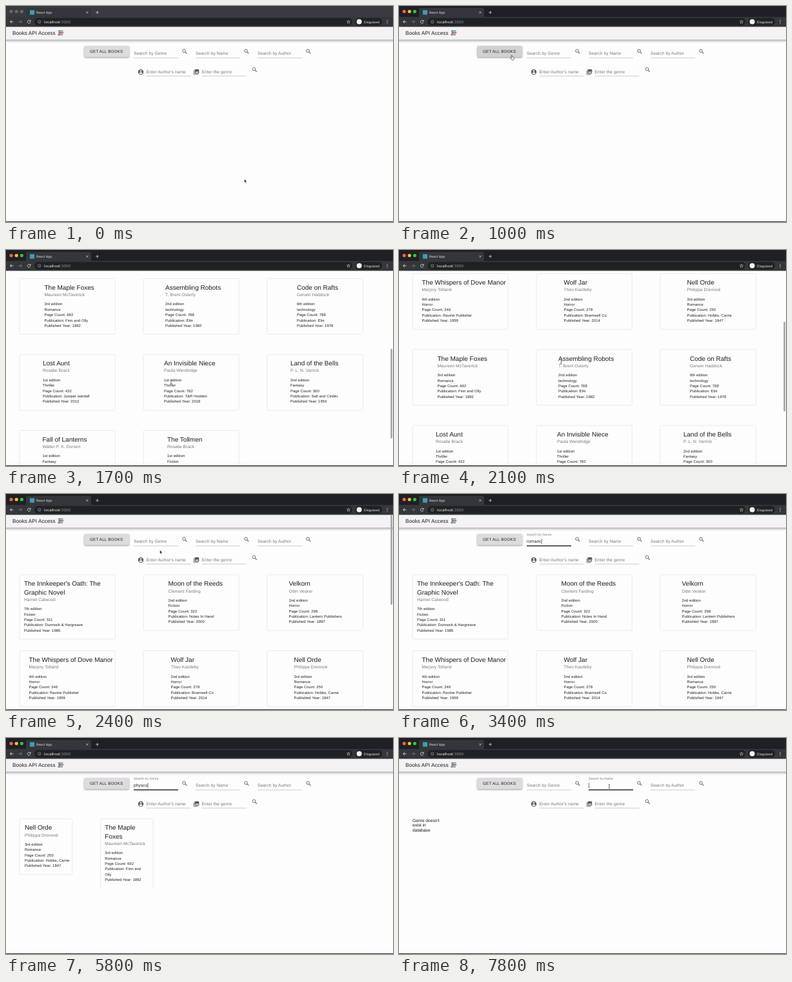
These frames come from a looping animation (600x337 px, 8 s). An HTML page with a canvas:

```html
<!DOCTYPE html>
<html lang="en">
<head>
<meta charset="utf-8">
<title>Books API Access</title>
<style>
  html, body { margin: 0; width: 100%; height: 100%; overflow: hidden; background: #fefdfe; }
  canvas { display: block; width: 600px; height: 337px; }
</style>
</head>
<body>
<canvas id="stage"></canvas>
<script>
const LOOP = 8000;
const PAGE = '#fefdfe', INK = '#1d1c1e', GREY = '#777579', ICON = '#5b595d';
const SANS = '"Liberation Sans", Arial, sans-serif';
const UI = 'Inter, Roboto, sans-serif';

const canvas = document.getElementById('stage');
const ctx = canvas.getContext('2d');
const dpr = Math.max(1, window.devicePixelRatio || 1);
canvas.width = 600 * dpr;
canvas.height = 337 * dpr;

// text x, title, author, edition, genre, pages, publisher, year
const BOOKS = [
  [28, "The Innkeeper's Oath: The|Graphic Novel", 'Harriet Calwood', '7th', 'Fiction', 311, 'Dunnock & Hargreave', 1985],
  [251.5, 'Moon of the Reeds', 'Clement Farding', '2nd', 'Fiction', 322, 'Notes In Hand', 2000],
  [438.5, 'Velkorn', 'Odin Vesker', '2nd', 'Horror', 298, 'Lantern Publishers', 1897],
  [35.5, 'The Whispers of Dove Manor', 'Marjory Tolland', '4th', 'Horror', 246, 'Ravine Publisher', 1959],
  [255.5, 'Wolf Jar', 'Theo Kastleby', '2nd', 'Horror', 278, 'Bramwell Co', 2014],
  [446.5, 'Nell Orde', 'Philippa Drennoë', '3rd', 'Romance', 250, 'Hobbs, Carne', 1847],
  [59.5, 'The Maple Foxes', 'Maureen McTaverick', '3rd', 'Romance', 692, 'Finn and Olly', 1892],
  [247, 'Assembling Robots', 'T. Brent Osterly', '2nd', 'technology', 788, 'Elm', 1982],
  [451, 'Code on Rafts', 'Gerwin Haddock', '6th', 'technology', 788, 'Elm', 1978],
  [57, 'Lost Aunt', 'Rosalie Brack', '1st', 'Thriller', 432, 'Juniper wardell', 2012],
  [245, 'An Invisible Niece', 'Paula Wendridge', '1st', 'Thriller', 782, 'T&R Hodden', 2018],
  [441, 'Land of the Bells', 'P. L. N. Varrick', '2nd', 'Fantasy', 300, 'Salt and Cinder', 1954],
  [56.5, 'Fall of Lanterns', 'Walter P. K. Dorsen', '1st', 'Fantasy', 654, 'Elm', 1996],
  [250, 'The Tollmen', 'Rosalie Brack', '1st', 'Fiction', 100, 'Ravine Publisher', 2014],
];

const FIELDS = [
  { x: 198, y: 81, label: 'Search by Genre', focus: [[2600, 4000], [4750, 6500]] },
  { x: 294, y: 81, label: 'Search by Name', focus: [[6830, LOOP + 1000]] },
  { x: 390, y: 81, label: 'Search by Author', focus: [] },
  { x: 217.5, y: 109.3, label: "Enter Author's name", focus: [] },
  { x: 303.5, y: 109.3, label: 'Enter the genre', focus: [] },
];
const SEARCH_ICONS = [[277, 71], [373, 71], [469, 71], [385.5, 99.5]];

const TYPING = [
  { word: 'romance', at: [2800, 2900, 3000, 3200, 3300, 3400, 3500], end: 4000 },
  { word: 'physcology', at: [5200, 5400, 5500, 5650, 5700, 5800, 6000, 6050, 6100, 6200], end: 6500 },
];

const POINTER = [
  [0, 369.5, 270], [150, 369.5, 270], [850, 174.8, 77], [1150, 174.8, 77],
  [1400, 256, 206], [1950, 256, 206], [2400, 238.5, 87.5], [2580, 228, 75],
  [3650, 228, 75], [3850, 277, 71], [4050, 277, 71], [4300, 305, 81.5],
  [4400, 305, 81.5], [4700, 250, 74.5], [6200, 250, 74.5], [6400, 277, 71],
  [6550, 277, 71], [6800, 326, 75.5], [LOOP, 326, 75.5],
];
const POINTER_HIDDEN = [[2800, 3650], [5200, 6250]];
const SCROLL = [[0, 0], [1300, 0], [1700, 318.5], [1800, 345], [1950, 345], [2300, 0], [LOOP, 0]];

const within = (t, spans) => spans.find(([a, b]) => t >= a && t < b);
const smooth = u => u * u * (3 - 2 * u);
const clamp01 = u => Math.min(1, Math.max(0, u));

function along(keys, t) {
  const i = Math.max(1, keys.findIndex(k => k[0] > t));
  const a = keys[i - 1], b = keys[i];
  const u = smooth(clamp01((t - a[0]) / (b[0] - a[0])));
  return a.slice(1).map((v, n) => v + (b[n + 1] - v) * u);
}

function rect(x, y, w, h, color, r = 0) {
  ctx.fillStyle = color;
  ctx.beginPath();
  ctx.roundRect(x, y, w, h, r);
  ctx.fill();
}

function disc(x, y, r, color) {
  ctx.fillStyle = color;
  ctx.beginPath();
  ctx.arc(x, y, r, 0, Math.PI * 2);
  ctx.fill();
}

function line(points, color, width = 0.8) {
  ctx.strokeStyle = color;
  ctx.lineWidth = width;
  ctx.beginPath();
  points.forEach(([x, y]) => ctx.lineTo(x, y));
  ctx.stroke();
}

function polygon(points, color, outline) {
  ctx.beginPath();
  points.forEach(([x, y]) => ctx.lineTo(x, y));
  ctx.closePath();
  ctx.fillStyle = color;
  ctx.fill();
  if (outline) {
    ctx.strokeStyle = outline;
    ctx.lineWidth = 0.6;
    ctx.stroke();
  }
}

function text(str, x, y, size, color = INK, spacing = 0.0094, font = SANS) {
  ctx.font = `${size}px ${font}`;
  ctx.letterSpacing = `${size * spacing}px`;
  ctx.fillStyle = color;
  ctx.fillText(str, x, y);
  return ctx.measureText(str).width;
}

function withShadow(blur, dy, alpha, paint) {
  ctx.save();
  ctx.shadowColor = `rgba(0,0,0,${alpha})`;
  ctx.shadowBlur = blur * dpr;
  ctx.shadowOffsetY = dy * dpr;
  paint();
  ctx.restore();
}

function browser(focused) {
  const bar = '#35363a', dark = '#202124', light = '#e4e5e8';
  rect(0, 0, 600, 18, focused ? '#1f2023' : '#3a3b3f');
  rect(0, 17, 600, 15.5, bar);
  rect(31, 3, 101, 17, bar, 3);
  ['#fe5f57', '#febc2e', '#28c840'].forEach((c, i) =>
    disc(8 + 8.2 * i, 8.6, 2.6, focused ? c : '#66676a'));
  rect(37, 6.5, 7, 7, '#3b9fb5');
  text('React App', 47, 11.9, 5, light, 0, UI);
  line([[124.3, 8.5], [127.5, 11.7]], light, 0.6);
  line([[127.5, 8.5], [124.3, 11.7]], light, 0.6);
  line([[139.2, 10], [144, 10]], light, 0.7);
  line([[141.6, 7.6], [141.6, 12.4]], light, 0.7);

  const arrow = (x, dir, color) => {
    line([[x - 2.6, 24.6], [x + 2.6, 24.6]], color);
    line([[x + dir * 0.2, 22.1], [x + dir * 2.6, 24.6], [x + dir * 0.2, 27.1]], color);
  };
  arrow(9, -1, light);
  arrow(22, 1, '#808184');
  ctx.strokeStyle = light;
  ctx.lineWidth = 0.8;
  ctx.beginPath();
  ctx.arc(35.7, 24.6, 2.4, 0.4, 5.5);
  ctx.stroke();
  polygon([[38.4, 21.8], [38.4, 24.2], [36, 24.2]], light);

  rect(44, 18.8, 493, 11.7, dark, 5.8);
  ctx.strokeStyle = '#b4b5b8';
  ctx.lineWidth = 0.6;
  ctx.beginPath();
  ctx.arc(51.8, 24.6, 2.3, 0, Math.PI * 2);
  ctx.stroke();
  line([[51.8, 24.3], [51.8, 25.9]], '#b4b5b8', 0.6);
  const w = text('localhost', 59, 26.7, 5.83, '#f1f2f4', 0, UI);
  text(':3000', 59 + w, 26.7, 5.83, '#97989c', 0, UI);
  const star = Array.from({ length: 10 }, (_, i) => {
    const a = -Math.PI / 2 + i * Math.PI / 5, r = i % 2 ? 1.2 : 2.8;
    return [531 + r * Math.cos(a), 24.8 + r * Math.sin(a)];
  });
  polygon(star, dark, '#d0d1d4');
  rect(541.5, 18.8, 41.5, 11.7, dark, 5.8);
  disc(547.6, 24.6, 4, '#f1f2f4');
  text('Disguised', 555, 26.6, 5.1, '#f1f2f4', 0, UI);
  [22.4, 24.6, 26.8].forEach(y => disc(591, y, 0.65, light));
}

function searchIcon(x, y) {
  ctx.strokeStyle = ICON;
  ctx.lineWidth = 0.9;
  ctx.beginPath();
  ctx.arc(x - 1, y - 1, 2.3, 0, Math.PI * 2);
  ctx.stroke();
  line([[x + 0.7, y + 0.7], [x + 3.4, y + 3.4]], ICON, 1.05);
}

function personIcon(x, y) {
  disc(x, y, 4.2, ICON);
  disc(x, y - 1.7, 1.25, PAGE);
  ctx.beginPath();
  ctx.ellipse(x, y + 1.9, 2.4, 1.3, 0, 0, Math.PI * 2);
  ctx.fill();
}

function photosIcon(x, y) {
  line([[x - 3.8, y - 2.4], [x - 3.8, y + 3.8], [x + 2.5, y + 3.8]], ICON, 0.85);
  rect(x - 2.5, y - 4.2, 6.7, 6.7, ICON, 0.8);
  polygon([[x - 1.7, y + 1.2], [x - 0.3, y - 0.7], [x + 0.6, y + 0.4], [x + 1.8, y - 1.2], [x + 3.5, y + 1.2]], PAGE);
}

function bookStack(x, y) {
  const colors = ['#4b9a62', '#b8434e', '#5a7fa8'];
  colors.forEach((c, i) => {
    const top = y + 2.7 * i, left = x + [0.6, 1.2, 0][i];
    rect(left, top, 7.4, 2.5, c, 0.6);
    rect(left + 2.2, top + 1.1, 5.2, 0.8, '#e9e4dc');
  });
}

function header(hover) {
  withShadow(4, 1.5, 0.42, () => rect(-10, 30, 620, 22.6, '#f5f2f6'));
  text('Books API Access', 10, 45.2, 8.2, INK, 0.004);
  bookStack(80.5, 38);
  withShadow(2.5, 1, 0.4, () => rect(121.2, 62.2, 69.8, 17.6, hover ? '#d2d0d3' : '#dddbde', 1.7));
  text('GET ALL BOOKS', 130, 73.2, 6.25, INK, 0.0286);
  SEARCH_ICONS.forEach(([x, y]) => searchIcon(x, y));
  personIcon(209, 103);
  photosIcon(295, 103);
}

function field({ x, y, label, focus }, t, hover) {
  const span = within(t, focus);
  const u = span ? 1 - (1 - clamp01((t - span[0]) / 200)) ** 3 : 0;
  text(label, x, y - 4.6 - 11 * u, 6.67 * (1 - 0.25 * u), GREY);
  line([[x, y], [x + 69, y]], hover ? INK : '#98969a', hover ? 0.9 : 0.5);
  if (!span) return;
  line([[x + 34.5 * (1 - u), y - 0.2], [x + 34.5 * (1 + u), y - 0.2]], INK, 0.9);

  const entry = TYPING.find(e => e.end === span[1]);
  const keys = entry ? entry.at.filter(k => k <= t) : [];
  const width = keys.length ? text(entry.word.slice(0, keys.length), x, y - 4.6, 6.67) : 0;
  const since = t - (keys.length ? keys[keys.length - 1] : span[0] - 30);
  if (since % 1000 < 500) rect(x + width + 0.2, y - 11, 0.6, 8, INK);
}

function card(x, y, w, book, textX) {
  const [, title, author, edition, genre, pages, publisher, year] = book;
  const titles = title.split('|');
  const details = [`${edition} edition`, genre, `Page Count: ${pages}`,
    ...`Publication: ${publisher}`.split('|'), `Published Year: ${year}`];
  const height = 87 + 13.4 * (titles.length - 1) + 8.34 * (details.length - 5);
  ctx.strokeStyle = '#dddbde';
  ctx.lineWidth = 0.6;
  ctx.beginPath();
  ctx.roundRect(x, y, w, height, 1.7);
  ctx.stroke();
  titles.forEach((s, i) => text(s, textX, y + 17.4 + 13.4 * i, 10, INK, 0));
  const base = y + 13.4 * (titles.length - 1);
  text(author, textX, base + 27.5, 6.67, GREY);
  details.forEach((s, i) => text(s, textX, base + 42 + 8.34 * i, 5.83, INK, 0.0107));
}

function results(t) {
  if (t < 1200) return;
  if (t < 4000) {
    BOOKS.forEach((b, i) => card(21 + 192 * (i % 3), 126 + 118.5 * Math.floor(i / 3), 148.3, b, b[0]));
  } else if (t < 6500) {
    const wrapped = BOOKS[6].map(v => typeof v === 'string'
      ? v.replace('Maple ', 'Maple|').replace('and ', 'and|') : v);
    ctx.save();
    ctx.beginPath();
    ctx.rect(0, 120, 600, 114);
    ctx.clip();
    card(21, 126, 81.7, BOOKS[5], 29);
    card(146.5, 126, 81.7, wrapped, 153.3);
    ctx.restore();
  } else {
    ["Genre doesn't", 'exist in', 'database'].forEach((s, i) =>
      text(s, 21, 130.5 + 7.5 * i, 6.67, '#111', 0));
  }
}

function pointer(x, y, kind) {
  ctx.save();
  ctx.translate(x, y);
  if (kind === 'text') {
    const stem = [[0, -2.6], [0, 2.6]];
    line(stem, '#fff', 1.4);
    line(stem, '#222', 0.7);
    [-1, 1].forEach(s => line([[-1.3, 3.2 * s], [0, 2.6 * s], [1.3, 3.2 * s]], '#222', 0.6));
  } else if (kind === 'hand') {
    polygon([[-0.6, 0], [0.5, 0], [0.7, 2.5], [3.2, 3], [3.7, 4.3], [3, 7.2], [0, 7.2],
      [-2.3, 4.3], [-1.8, 3.6], [-0.6, 4.4]], '#fff', '#222');
  } else {
    polygon([[0, 0], [0, 5.7], [1.3, 4.5], [2.2, 6.7], [3.2, 6.2], [2.3, 4.2], [4, 4.1]], '#111', '#fff');
  }
  ctx.restore();
}

function draw(t) {
  const [scroll] = along(SCROLL, t);
  const [px, py] = along(POINTER, t);
  const atTop = scroll < 1;
  const onButton = atTop && px > 121 && px < 191 && py > 62 && py < 80;
  const onIcon = SEARCH_ICONS.some(([x, y]) => Math.hypot(px - x, py - y) < 6);
  const hovered = atTop && FIELDS.find(f => px >= f.x && px <= f.x + 69 && py > f.y - 13 && py < f.y + 1);

  ctx.setTransform(dpr, 0, 0, dpr, 0, 0);
  ctx.textRendering = 'geometricPrecision';
  rect(0, 0, 600, 337, PAGE);
  ctx.save();
  ctx.translate(0, -scroll);
  header(onButton);
  FIELDS.forEach(f => field(f, t, f === hovered));
  results(t);
  ctx.restore();

  if (t >= 1300 && t < 2700) rect(596.2, 33 + scroll * 0.38, 2.8, 140, '#aaa8ab', 1.4);
  rect(0, 336, 600, 1, '#2b2a2d');
  browser(t >= 300);

  if (!within(t, POINTER_HIDDEN)) {
    const kind = onButton || onIcon ? 'hand' : hovered || !atTop ? 'text' : 'arrow';
    pointer(px, py, kind);
  }
}

const start = performance.now();
function tick() {
  draw((performance.now() - start) % LOOP);
  requestAnimationFrame(tick);
}
tick();
</script>
</body>
</html>
```
